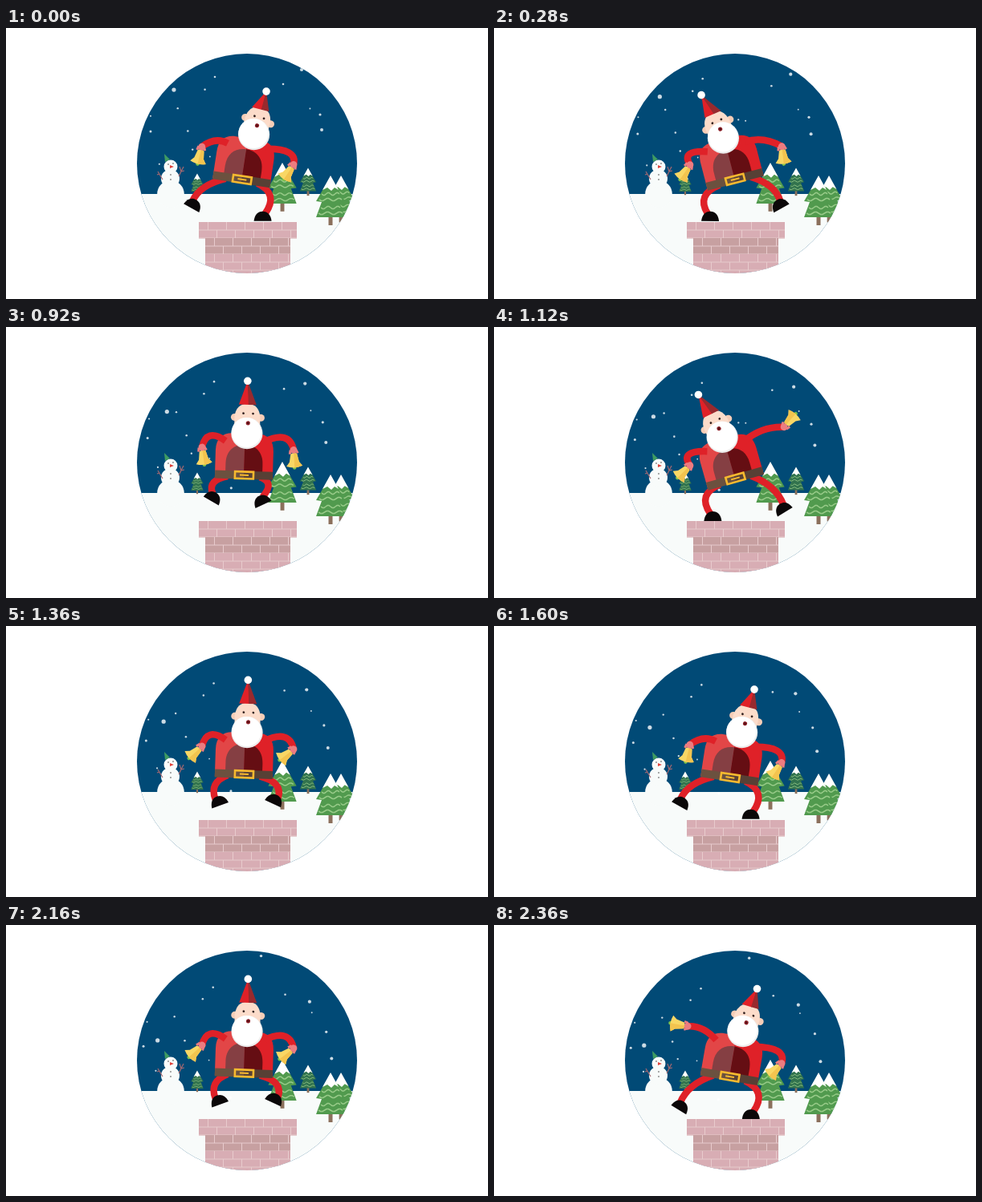
An HTML page with a canvas that plays this animation: 600 by 338 pixels, repeating every 2.4 s.

```html
<!DOCTYPE html>
<html>
<head>
<meta charset="utf-8">
<style>
html, body { margin: 0; width: 100%; height: 100%; overflow: hidden; background: #fff; }
canvas { display: block; }
</style>
</head>
<body>
<canvas id="stage" width="600" height="338"></canvas>
<script>
const ctx = document.getElementById('stage').getContext('2d');
const LOOP = 2400, DANCE = 800, LEAN_PEAK = 740, HORIZON = 207;
const RED = '#df2128', LIT_RED = '#e24647', GREEN = '#519a4e', DARK_GREEN = '#32734e', SNOW = '#f8fbfa', GOLD = '#f7b92f';

let seed = 11;
const random = () => (seed = seed * 16807 % 2147483647) / 2147483647;

// Bright flakes as x, y, radius, then a sprinkle of small ones
const flakes = [
  [209, 77, 2.6], [368, 52, 2.1], [391, 108, 1.6], [393, 127, 2],
  [345, 70, 1.3], [260, 61, 1.3], [180, 129, 1.5], [281, 190, 1.6], [316, 10, 1.7]
];
for (let i = 0; i < 10; i++)
  flakes.push([180 + 240 * random(), 45 + 145 * random(), .9 + .5 * random()]);

function circle(x, y, r, color) {
  ctx.fillStyle = color;
  ctx.beginPath();
  ctx.arc(x, y, r, 0, 7);
  ctx.fill();
}
function rect(x, y, w, h, color) {
  ctx.fillStyle = color;
  ctx.fillRect(x, y, w, h);
}
function shape(d, color) {
  ctx.fillStyle = color;
  ctx.fill(new Path2D(d));
}
function line(d, color, width) {
  ctx.strokeStyle = color;
  ctx.lineWidth = width;
  ctx.stroke(new Path2D(d));
}
function placed(x, y, deg, draw) {
  ctx.save();
  ctx.translate(x, y);
  ctx.rotate(deg * Math.PI / 180);
  draw();
  ctx.restore();
}
function local(x, y, deg, dx, dy) {
  const a = deg * Math.PI / 180, c = Math.cos(a), s = Math.sin(a);
  return [x + dx * c - dy * s, y + dx * s + dy * c];
}

function tree(x, y, scale, color) {
  ctx.save();
  ctx.translate(x, y);
  ctx.scale(scale, scale);
  rect(-2.5, 49, 5, 12, '#8b705c');
  shape('M0 0L18 31 11 32 18 51H-18L-11 32-18 31Z', color);
  for (const [wy, half] of [[22, 11], [29, 14], [39, 12], [46, 15]]) {
    let wave = `M${-half} ${wy}`;
    for (let i = 1; i <= 12; i++)
      wave += `L${-half + half * i / 6} ${wy + 1.6 * Math.sin(i * Math.PI / 3)}`;
    line(wave, '#98cb89', 1.5);
  }
  shape('M0-1L10 17 5 14 1 18-4 14-10 17Z', '#fff');
  ctx.restore();
}

function snowman() {
  circle(205, 207, 16.8, SNOW);
  circle(204.5, 188, 11.5, SNOW);
  circle(205, 173, 8.5, SNOW);
  shape('M197 157L204 164 198 167Z', '#3f9b62');
  line('M195 189L189 179M191 182L188 183M215 185L221 173M218 179L216 173M218 179L222 178', '#a66870', 1.2);
  shape('M204 171L209 173 204 175Z', '#e0433c');
  for (const [x, y] of [[202, 170], [208, 169], [205, 183], [205, 189]]) circle(x, y, .8, '#444');
}

function bricks(x, y, w, rows, color) {
  rect(x, y, w, rows * 10 + .5, color);
  for (let row = 0; row < rows; row++) {
    const top = y + row * 10;
    for (let bx = x + (row % 2 ? 22 : 11); bx < x + w; bx += 23) rect(bx, top, 1, 10, '#e8cbcd');
    rect(x, top + 9.5, w, 1, '#e8cbcd');
  }
}

function scene(t) {
  rect(160, 30, 280, 280, '#014a76');
  rect(160, HORIZON, 280, 100, SNOW);
  snowman();
  tree(238, 182, .43, DARK_GREEN);
  tree(376, 175, .56, DARK_GREEN);
  tree(344, 169, .98, GREEN);
  tree(417, 185, .94, GREEN);
  tree(404, 185, 1, GREEN);
  bricks(240, 242, 122, 2, '#d8adb4');
  bricks(248, 262, 106, 2, '#c7a0a1');
  bricks(248, 282, 106, 3, '#d8adb4');
  // Bigger flakes are nearer: they fall faster and spread outwards
  for (const [x, y, r] of flakes) {
    const fall = 11 * r * r * t / LOOP;
    circle(x + fall * (x - 300) / 300, y + fall, r, 'rgba(255,255,255,.8)');
  }
}

function bell(x, y, deg) {
  placed(x, y, deg, () => {
    circle(0, 22, 2.3, '#7cc04b');
    shape('M-4 5Q0 2 4 5L6 15 10 20Q0 24-10 20L-6 15Z', '#f9d765');
    shape('M0 4Q3 3 4 5L6 15 10 20Q5 22 0 22Z', '#f3c44f');
    circle(0, 0, 4.4, '#ec7c80');
    line('M-4 0L-5 5M3 0L5 4', '#ec7c80', 3);
  });
}

// A bent limb whose middle is pushed away from the straight line
function limb([x1, y1], [x2, y2], bendX, bendY) {
  line(`M${x1} ${y1}Q${(x1 + x2) / 2 + bendX} ${(y1 + y2) / 2 + bendY} ${x2} ${y2}`, RED, 8.5);
}

function santa(t) {
  const phase = (t - LEAN_PEAK) / DANCE * 2 * Math.PI;
  const sway = Math.cos(phase), turn = Math.sin(phase);
  const hop = turn ** 4;
  const belt = [296.5 - 3.5 * sway, 189 - 4.5 * hop, -3 + 13 * sway + 3 * hop];

  const leg = side => {
    const inward = side * sway, free = Math.max(0, -inward);
    const x = 297 + side * (45 - 21.5 * inward - 13 * hop) - 6 * turn;
    const y = 238 + 4 * inward - 18 * hop - 22 * free * turn;
    const deg = -side * (27 * turn * hop + 32 * free);
    limb(local(...belt, side * 20, 2), local(x, y, deg, side * 3, -9), side * (17 + 6 * inward), -6);
    placed(x, y, deg, () => shape('M-11 0C-10-8-6-12 0-12S10-8 11 0Z', '#0b0809'));
  };

  const arm = side => {
    const inward = side * sway, low = Math.max(0, inward);
    const raise = Math.max(0, -inward) ** 24;
    const x = 301 + side * (57 + 4 * raise), y = 150 + 23 * low - 33 * raise;
    const deg = 20 - 28 * turn + 30 * low - raise * (side * 160 + 42);
    limb(local(...belt, side * 24, -42), [x, y], side * (11 + 13 * inward), -10 - 11 * hop);
    bell(x, y, deg);
  };

  leg(-1);
  leg(1);
  placed(...belt, () => {
    shape('M-36 4V-30C-36-45-28-52-15-52H0V4Z', LIT_RED);
    shape('M36 4V-30C36-45 28-52 15-52H0V4Z', RED);
    shape('M-23 0V-14C-23-30-13-38 0-38V0Z', '#853f43');
    shape('M23 0V-14C23-30 13-38 0-38V0Z', '#650e13');
    rect(-36, -5, 36, 10, '#6b513f');
    rect(0, -5, 36, 10, '#574035');
    ctx.strokeStyle = GOLD;
    ctx.lineWidth = 2.6;
    ctx.strokeRect(-11, -4.2, 23, 8.6);
    rect(-5, -1, 11, 2, GOLD);
  });
  arm(-1);
  arm(1);

  const head = [297 + 13 * sway + hop, 135 - 2.5 * sway - 2 * hop, -4.5 + 21.5 * sway + 3 * hop];
  const tip = [291 + 37 * sway + 4.5 * hop, 82 - 2.5 * sway - 15 * hop];
  const squash = .89 + .11 * hop;
  const brim = dx => local(...head, dx, -36 * squash);
  placed(...head, () => {
    const top = -21 * squash;
    circle(-16, top + 1, 4.5, '#f6cdb7');
    circle(17, top + 1, 4.5, '#f6cdb7');
    shape(`M-16 0V${top}Q-14 ${top - 16} 0 ${top - 16}T16 ${top}V0Z`, '#fcdcca');
  });
  shape(`M${tip}L${brim(-11)} ${brim(2)}Z`, RED);
  shape(`M${tip}L${brim(1)} ${brim(11)}Z`, '#982a2e');
  circle(...tip, 4.8, '#fff');
  circle(head[0], head[1], 19.6, '#ececec');
  circle(head[0] - .5, head[1] - 1.2, 18.6, '#fff');
  placed(...head, () => {
    circle(-5, -25 * squash, 1.4, '#33211f');
    circle(7, -25 * squash, 1.4, '#33211f');
    circle(1, -13 * squash, 2.6, '#8d2028');
    circle(1, -13 * squash, 1.3, '#4f1015');
  });
}

function frame(now) {
  const t = now % LOOP;
  ctx.clearRect(0, 0, 600, 338);
  ctx.save();
  ctx.beginPath();
  ctx.arc(300, 169, 137, 0, 7);
  ctx.clip();
  scene(t);
  santa(t);
  ctx.restore();
  requestAnimationFrame(frame);
}
requestAnimationFrame(frame);
</script>
</body>
</html>
```
